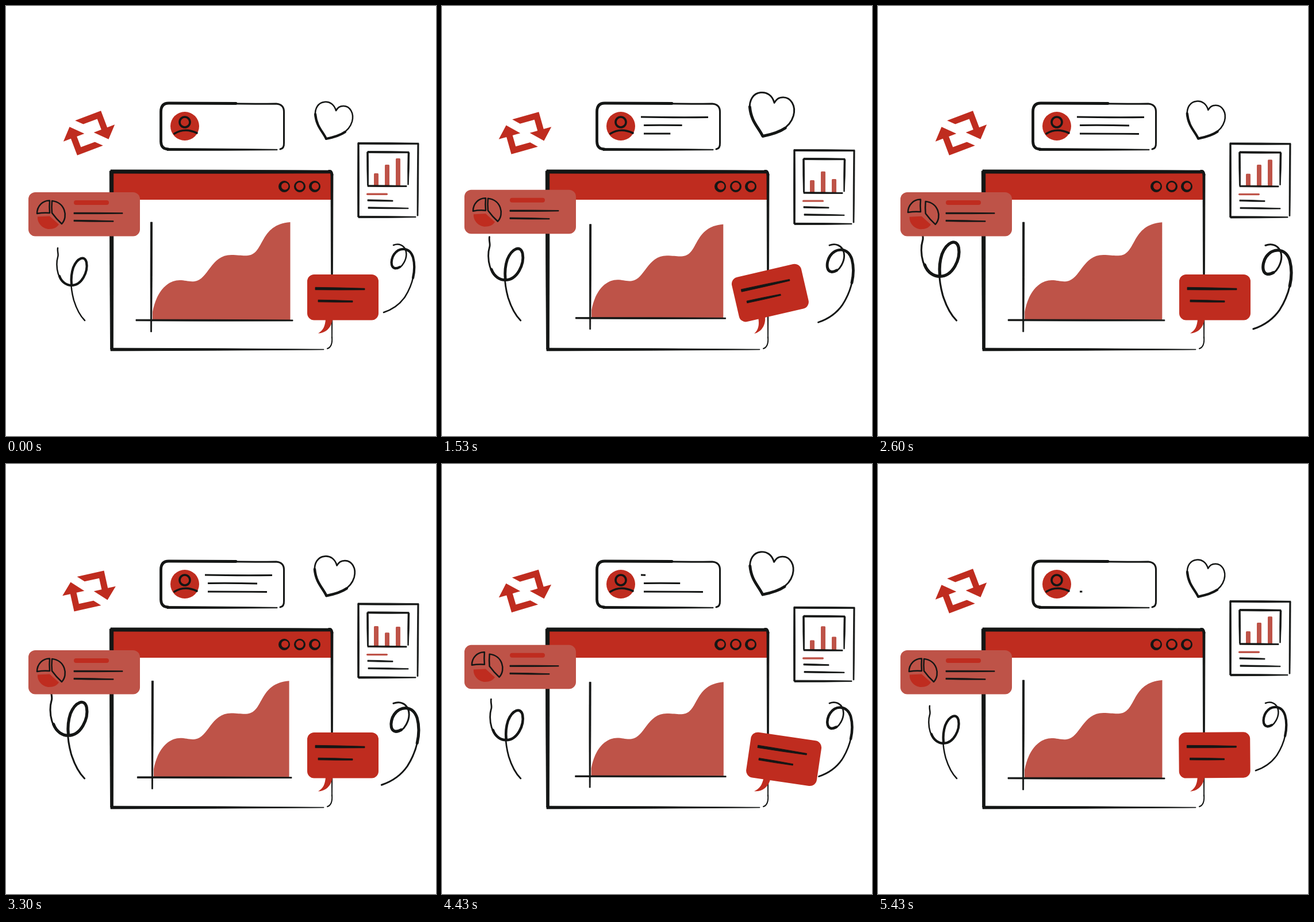
An HTML page that plays this animation: 748 by 748 pixels, repeating every 5510 ms.

```html
<!DOCTYPE html>
<html lang="en">
<head>
<meta charset="utf-8">
<title>Dashboard illustration</title>
<style>
  html, body { margin: 0; width: 100%; height: 100%; overflow: hidden; background: #fff; }
  svg { display: block; width: 100vw; height: 100vh; }
  .ink { fill: #141615; stroke: #141615; stroke-width: .8; stroke-linejoin: round; }
  .pen { fill: none; stroke: #141615; stroke-width: 3; stroke-linecap: round; stroke-linejoin: round; }
  .fine { stroke-width: 2.5; }
  .bold { stroke-width: 4.8; }
  .red { fill: #bf2c1f; }
  .rose { fill: #be5348; }
  .reveal { stroke-linecap: butt; }
</style>
</head>
<body>
<svg viewBox="0 0 748 748">
  <g id="arrows" class="red">
    <path id="arrow" d="M-15-29H33V2H47L28 22L8 2H22V-18H-4Z"/>
    <use href="#arrow" transform="rotate(180)"/>
  </g>

  <g id="profile">
    <path class="pen" d="M283 169C330 168 420 171 470 170Q483.500 171 483.500 184V238Q484 248 477 249"/>
    <path class="pen bold" d="M400 169.500C350 169 310 169 283 169Q269.500 169 269.500 184V236Q270 249 282 249"/>
    <circle class="red" cx="311" cy="209" r="25"/>
    <circle class="pen" style="stroke-width:3.6" cx="311" cy="202" r="9"/>
    <path class="pen" style="stroke-width:3.6" d="M293 222Q311 211 332 221"/>
    <path class="pen reveal" pathLength="1" d="M346 193Q400 194 463 193.500"/>
    <path class="pen reveal" pathLength="1" d="M351 207.500Q395 207 437 208"/>
    <path class="pen reveal" pathLength="1" d="M351 222Q400 222 454 222.500"/>
  </g>

  <g id="heart">
    <path class="pen fine" d="M574 182C571 171 563 166 554 167C543 168 537 178 538 191C540 210 551 218 557 231C568 228 595 225 602 201C606 186 598 174 587 174C580 174 577 177 574 182"/>
    <path class="pen" style="stroke-width:4.200" d="M538 188C540 210 551 218 557 231C567 229 580 226 590 219"/>
  </g>

  <g id="sheet">
    <g class="rose">
      <rect class="bar" x="640" width="8" rx="1.500"/>
      <rect class="bar" x="659" width="8" rx="1.500"/>
      <rect class="bar" x="678" width="8" rx="1.500"/>
      <rect x="627" y="325.500" width="37" height="3.400" rx="1.700"/>
    </g>
  </g>

  <g id="window">
    <path class="red" d="M185 289H566V337H185Z"/>
    <path class="pen" style="stroke-width:2" d="M567 576C568 588 565 594 559 596"/>
    <path class="pen bold" d="M562 287.500Q567 287 567 294"/>
  </g>

  <g id="chart">
    <path class="rose" d="M255 546V532C262 495 282 477 302 477C312 477 318 480 328 479C352 476 356 433 392 433C405 433 412 435 421 434C450 431 440 380 494.500 376V546Z"/>
  </g>

  <g id="curlLeft">
    <path class="pen fine" d="M90 421C89 428 92 432 90 437C86 450 88 484 114 486C132 486 143 462 140 446C137 433 124 438 117 455C112 470 112 490 118 512C123 528 129 539 137 547"/>
    <path class="pen bold" style="stroke-width:4.200" d="M93 470C97 481 106 486 114 486C132 486 143 462 140 446C137 433 124 438 117 455C114 464 113 474 114 484"/>
  </g>

  <g id="curlRight">
    <path class="pen fine" d="M674 416C684 412 692 417 695 424C700 438 689 458 677 457C668 455 669 441 675 432C684 419 702 419 708 437C714 457 708 484 694 506C685 519 672 528 657 533"/>
    <path class="pen bold" style="stroke-width:4.200" d="M685 454C668 463 668 442 675 432C684 419 702 419 708 437C711 448 711 460 708 473"/>
  </g>

  <g id="label">
    <rect class="rose" x="39" y="324" width="194" height="76.500" rx="12"/>
    <rect class="red" x="118" y="338" width="61" height="8" rx="4"/>
    <path class="pen fine slice" d="M54 361Q65 359 76 360Q75 349 76 338.500C64 338 54 348 54 361Z"/>
    <path class="pen fine slice" d="M80 339Q79 350 80 360Q88 371 97 379C109 366 102 341 80 339Z"/>
    <path class="red slice" d="M55 366.500C54 378 64 388 75 388C83 388 89 385 92 380L76 365.500Z"/>
  </g>

  <g id="bubble">
    <path class="red" d="M556 545C555 557 552 564 543 569.500C556 569 566 560 568 545Z"/>
    <rect class="red" x="524" y="467" width="124" height="79.500" rx="12"/>
  </g>
</svg>
<script>
const NS = 'http://www.w3.org/2000/svg';
const LOOP = 5510, SPAN = 5500, HALF = SPAN / 2;
const $ = id => document.getElementById(id);
const all = name => [...document.querySelectorAll(name)];

function add(group, tag, attrs) {
  const el = document.createElementNS(NS, tag);
  for (const key in attrs) el.setAttribute(key, attrs[key]);
  group.append(el);
}

// Straight brush stroke whose width runs from a to b, a little fuller in the middle.
function ink(id, x1, y1, x2, y2, a, b) {
  const len = Math.hypot(x2 - x1, y2 - y1);
  const nx = (y1 - y2) / len, ny = (x2 - x1) / len;
  const mx = (x1 + x2) / 2, my = (y1 + y2) / 2, m = (a + b) / 2 + 1;
  const at = (x, y, w) => `${x + nx * w / 2} ${y + ny * w / 2}`;
  add($(id), 'path', {
    class: 'ink',
    d: `M${at(x1, y1, a)}Q${at(mx, my, m)} ${at(x2, y2, b)}L${at(x2, y2, -b)}Q${at(mx, my, -m)} ${at(x1, y1, -a)}Z`
  });
}

// Ring with an off-centre hole, as drawn with a soft pen.
function ring(cx, dx, r) {
  add($('window'), 'circle', { class: 'ink', cx, cy: 314, r: 9.6 });
  add($('window'), 'circle', { class: 'red', cx: cx + dx, cy: 313.5, r });
}

ink('profile', 280, 249.5, 472, 250, 4, 1.4);

ink('window', 182, 288, 566, 288.5, 6.2, 4.8);
ink('window', 183.5, 287, 184, 597, 6.6, 4.8);
ink('window', 182, 597.5, 553, 597.5, 4.8, .8);
ink('window', 567, 292, 567, 578, 4, 1.2);
ring(484, 1.2, 6.2);
ring(511, 0, 6.8);
ring(537, 1, 6.2);

ink('chart', 253, 376, 252.5, 567, 3.2, 2);
ink('chart', 226, 546.5, 499, 547, 2.6, 2);

ink('sheet', 612, 239, 718, 239.5, 3, 2.4);
ink('sheet', 613, 239, 613, 367, 2.4, 2.6);
ink('sheet', 613, 367, 713, 367, 3.2, 1.4);
ink('sheet', 717, 240, 716, 365, 2.2, 1.8);
ink('sheet', 629, 254, 701, 254.5, 3, 2.4);
ink('sheet', 629, 254, 629.5, 312, 2.6, 2);
ink('sheet', 629, 313, 697, 313.5, 2.4, 2);
ink('sheet', 700.5, 255, 699.5, 311, 2.8, 1.4);
ink('sheet', 629, 338, 673, 339, 2.4, 1.8);
ink('sheet', 630, 351, 700, 352, 2.4, 1.4);

ink('label', 118, 360.5, 203, 360.5, 2.4, 1.4);
ink('label', 118, 373.5, 187, 374.5, 2.4, 1.4);

ink('bubble', 538, 491.5, 624, 492.5, 4.4, 2.6);
ink('bubble', 543, 513, 603, 514, 3.6, 2.4);

const clamp = x => Math.min(1, Math.max(0, x));
const smooth = u => u * u * (3 - 2 * u);
const tent = p => 1 - Math.abs(2 * p - 1);

// Value at time t on a list of [time, value] stops, eased between stops.
function track(stops, t) {
  for (let i = 1; i < stops.length; i++) {
    const [t0, v0] = stops[i - 1], [t1, v1] = stops[i];
    if (t <= t1) return v0 + (v1 - v0) * smooth((t - t0) / (t1 - t0));
  }
  return stops[stops.length - 1][1];
}

const spin = [[0, 0], [1400, 5.2], [2600, 0], [3400, 8.6], [5500, 0]];
const lift = [[0, 0], [950, -9.2], [2100, 0], [3550, 0], [4500, -9.2], [5400, 0]];
const tilt = [[0, 0], [450, -.2], [1450, -13.5], [2350, 0], [3350, 0], [4200, 9.5], [5350, 0], [5450, -.5], [5500, 0]];
const heights = [[22, 42.5, 15.8], [37, 17, 43], [48, 27.2, 23]];
const pops = [
  { x: -3, y: -3, stops: [[0, 0], [.3, 0], [.5, 1], [.8, 0]] },
  { x: 3, y: 1, stops: [[0, 0], [.15, 0], [.38, 1], [.6, 0]] },
  { x: -1.5, y: 2.5, stops: [[0, 0], [.05, 0], [.25, 1], [.45, 0]] }
];
const bars = all('.bar'), slices = all('.slice'), lines = all('.reveal');

const move = (el, value) => el.setAttribute('transform', value);
const scaleAt = (id, x, y, s) => move($(id), `translate(${x} ${y}) scale(${s}) translate(${-x} ${-y})`);

function pose(t) {
  const p = t % HALF / HALF, beat = tent(p), sway = smooth(beat);
  const slow = tent(t / SPAN), grow = (slow + smooth(slow)) / 2;

  move($('arrows'), `translate(144.5 221) rotate(${track(spin, t) - 20.7})`);
  move($('label'), `translate(0 ${track(lift, t)})`);
  move($('bubble'), `rotate(${track(tilt, t)} 545 569)`);
  move($('sheet'), `translate(0 ${12.5 * sway})`);
  scaleAt('heart', 552, 255, 1 + .22 * beat ** 1.2);
  scaleAt('chart', 373.5, 461.5, 1 - .045 * sway);
  scaleAt('curlLeft', 139, 547, 1 + .265 * grow);
  scaleAt('curlRight', 674, 414, 1 + .25 * grow);

  bars.forEach((bar, i) => {
    const [a, b, c] = heights[i];
    const h = track([[0, a], [1 / 3, b], [2 / 3, c], [1, a]], p);
    bar.setAttribute('y', 313 - h);
    bar.setAttribute('height', h);
  });

  const q = t * 3 / SPAN % 1;
  slices.forEach((slice, i) => {
    const { x, y, stops } = pops[i], k = track(stops, q);
    move(slice, `translate(${x * k} ${y * k})`);
  });

  lines.forEach((line, i) => {
    const shown = clamp((t - 187 - 400 * i) / 1250);
    const left = clamp((4502 + 490 * i - t) / 742);
    line.setAttribute('stroke-dasharray', `${Math.min(shown, left)} 2`);
  });
}

// Poses are 50 ms apart but held for 30 and 70 ms in turn.
function tick() {
  const t = performance.now() % LOOP;
  const step = 2 * Math.floor(t / 100) + (t % 100 >= 30 ? 1 : 0);
  pose(Math.min(step, 109) * 50);
  requestAnimationFrame(tick);
}
tick();
</script>
</body>
</html>
```
